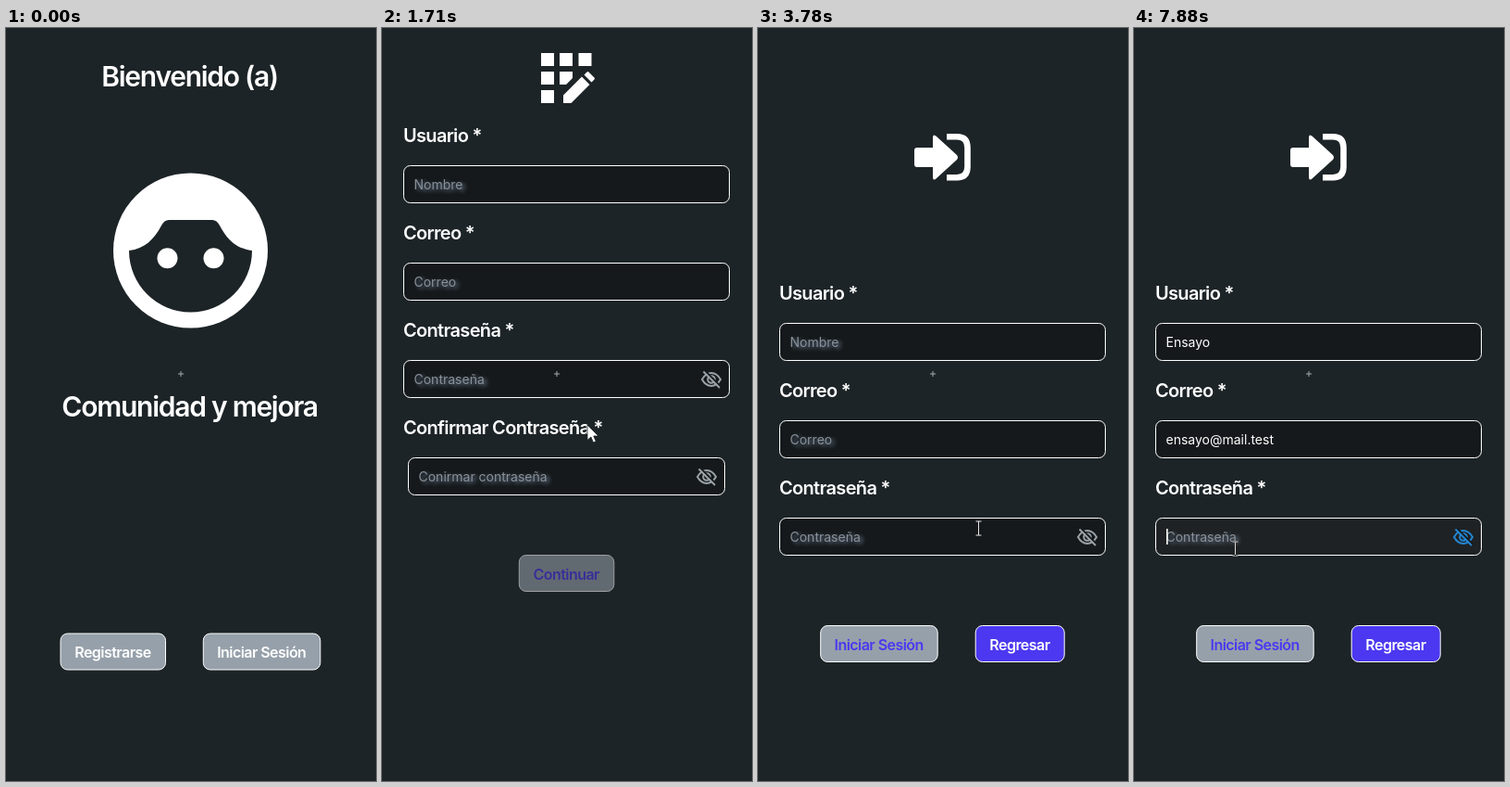
Animation of 400x812 px, one loop 8000 ms. Source, as an HTML page:

```html
<!DOCTYPE html>
<html lang="es">
<head>
<meta charset="utf-8">
<style>
  html, body { margin: 0; width: 100%; height: 100%; overflow: hidden; background: #1d2427; }
  svg { display: block; width: 400px; height: 812px; font-family: Inter, sans-serif; font-optical-sizing: none; }
  .title { font-size: 30px; font-weight: 600; letter-spacing: -.042em; text-anchor: middle; fill: #fff; }
  .label { font-size: 20px; font-weight: 600; letter-spacing: -.034em; fill: #fff; }
  .button { font-size: 16px; font-weight: 600; letter-spacing: -.034em; text-anchor: middle; }
  .value { font-size: 14px; fill: #fff; }
  .hint { font-size: 14px; fill: #89929a; filter: drop-shadow(3px 2px 2px #6c7c94); }
  .box { fill: #15191b; stroke: #fff; }
  .box.focus { fill: #1f2224; }
  .eye { fill: none; stroke: #9aa2a8; stroke-width: 2; }
  .eye.focus { stroke: #2385d2; }
  #ibeam { mix-blend-mode: difference; }
</style>
</head>
<body>
<svg id="stage" viewBox="0 0 400 812"></svg>
<script>
const DURATION = 8000, BLINK = 530;
const GREY = '#96a0aa', HOVER = '#9fa8b2', VIOLET = '#4b38f0';
const stage = document.getElementById('stage');

const button = (x, y, width, text, fill, color, id = '') => `
  <rect id="${id}" x="${x}" y="${y}" width="${width}" height="39" rx="7.5" fill="${fill}" stroke="#fff"/>
  <text class="button" x="${x + width / 2 - .3}" y="${y + 26}" fill="${color}">${text}</text>`;

const eye = (x, y) => `
  <g class="eye" transform="translate(${x} ${y})">
    <path d="M-10 0Q-6-7 0-7T10 0Q6 7 0 7T-10 0Z"/><circle r="3.8"/>
    <path d="M-7-9.5L10.5 8" stroke="#15191b"/><path d="M-8.5-8.5L9 9"/>
  </g>`;

const field = (y, label, hint, secret, inset = 0) => `
  <g class="field">
    <text class="label" x="23" y="${y - 25}">${label} *</text>
    <rect class="box" x="${23.5 + inset}" y="${y + .5}" width="${352 - 2 * inset}" height="40" rx="7"/>
    <text class="hint" x="${34.5 + inset}" y="${y + 26}">${hint}</text>
    <text class="value" x="34.5" y="${y + 26}"></text>
    ${secret ? eye(356 - inset, y + 21) : ''}
  </g>`;

const fields = y => field(y, 'Usuario', 'Nombre') + field(y + 105, 'Correo', 'Correo')
  + field(y + 210, 'Contraseña', 'Contraseña', true);

stage.innerHTML = `
  <rect width="400" height="812" fill="#1d2427"/>
  <g id="welcome">
    <text class="title" x="198.6" y="63">Bienvenido (a)</text>
    <circle cx="199.5" cy="240" r="83.5" fill="#fff"/>
    <path fill="#1d2427" d="M133 240A66.5 66.5 0 0 0 266 240C249 238 239 228 231 213Q228 207 223 207H176Q171 207 168 213C160 228 150 238 133 240Z"/>
    <circle cx="174.5" cy="248.3" r="11" fill="#fff"/><circle cx="224.5" cy="248.3" r="11" fill="#fff"/>
    <text class="title" x="198.6" y="419">Comunidad y mejora</text>
    ${button(59, 653, 113.5, 'Registrarse', GREY, '#fff')}
    ${button(213.3, 653, 126.5, 'Iniciar Sesión', GREY, '#fff', 'enter')}
  </g>
  <g id="register">
    <path fill="#fff" d="M172 27h14v14h-14zM192 27h14v14h-14zM212.500 27h14v14h-14zM172 47h14v14h-14zM192 47h14v7l-7 7h-7zM172 67h14v14h-14z
      M196 81v-8.500l20-20 8.500 8.500-20 20zM218.500 50.500l3-3q1-1 2 0l6 6q1 1 0 2l-3 3z"/>
    ${fields(148)}${field(463, 'Confirmar Contraseña', 'Conirmar contraseña', true, 5)}
    <g opacity=".57">${button(148.3, 568.5, 102.5, 'Continuar', GREY, VIOLET)}</g>
  </g>
  <g id="login">
    <path fill="#fff" d="M169 132q0-3 3-3H189V119q0-6 4-2L215 137q2 2.500 0 5L193 162q-4 4-4-2V150H172q-3 0-3-3Z"/>
    <path fill="none" stroke="#fff" stroke-width="6.6" d="M204 117.300H215Q226.500 117.300 226.500 129V149.500Q226.500 161.200 215 161.200H204"/>
    ${fields(318)}
    ${button(67.7, 644.5, 126.5, 'Iniciar Sesión', GREY, VIOLET)}
    ${button(235.2, 644.5, 96, 'Regresar', VIOLET, '#fff')}
    <rect id="caret" width="1.6" height="17" fill="#fff"/>
  </g>
  <path d="M186 373h6M189 370v6" stroke="#a4abad"/>
  <path id="arrow" fill="#fff" stroke="#111820" stroke-width=".8" d="M0 0V16.500L3.900 13 6.400 19 9.300 17.800 6.800 12H12Z"/>
  <path id="hand" fill="#fff" stroke="#111" d="M-2 2A2 2 0 0 1 2 2V8.500Q5.500 7 6 9.500 9 8.500 9.500 11 12 10.500 12 13V16Q12 19 10 23H1Q-1 18-6 13.500-7 11-4.500 11L-2 13Z"/>
  <path id="ibeam" fill="none" stroke="#fff" d="M-3-7.500H3M0-7.500V7.500M-3 7.500H3"/>`;

const byId = id => document.getElementById(id);
const show = (id, on) => byId(id).style.display = on ? '' : 'none';

// Each move: start, end, number of steps, points spread evenly over the steps.
const moves = [
  [330, 1120, 13, [[308, 703], [240, 660], [145, 616], [97, 640], [114, 656.5]]],
  [1180, 1980, 13, [[114, 656.5], [95, 540], [78, 410], [173, 325], [222, 428], [300, 520], [350, 588]]],
  [2050, 2440, 7, [[350, 588], [42, 381]]],
  [2580, 3310, 12, [[42, 381], [150, 480], [260, 600], [337, 697], [301, 681]]],
  [3450, 3780, 6, [[301, 681], [270, 610], [238.5, 539.5]]],
  [3780, 4240, 8, [[238.5, 539.5], [180, 430], [116.5, 343.5]]],
  [6280, 6680, 7, [[116.5, 343.5], [124.5, 434.5]]],
  [7410, 7810, 7, [[124.5, 434.5], [109.5, 561.5]]]
];

function pointerAt(time) {
  const move = moves.findLast(([start]) => time >= start);
  if (!move) return null;
  const [start, end, steps, points] = move;
  const progress = Math.min(1, (time - start) / (end - start));
  const at = Math.floor(progress * (steps - 1) + .1) / (steps - 1) * (points.length - 1);
  const i = Math.min(Math.floor(at), points.length - 2);
  return points[i].map((v, axis) => v + (points[i + 1][axis] - v) * (at - i));
}

const inside = ([x, y], left, top, right, bottom) => x > left && x < right && y > top && y < bottom;

function pointerKind(page, point) {
  const tops = { welcome: [], register: [148, 253, 358, 463], login: [318, 423, 528] }[page];
  if (tops.some(top => inside(point, 23, top, 376, top + 41))) return 'ibeam';
  const overButton = page === 'welcome'
    ? inside(point, 59, 653, 173, 692) || inside(point, 213, 653, 340, 692)
    : page === 'login' && inside(point, 235, 644, 331, 684);
  return overButton ? 'hand' : 'arrow';
}

const focusTimes = [4170, 6750, 7820];
const keyTimes = [4900, 5230, 5345, 5460, 5575, 5690];
const EMAIL_TIME = 7345;
const loginFields = [...document.querySelectorAll('#login .field')];

function drawLogin(time) {
  const focus = focusTimes.findLastIndex(start => time >= start);
  const typed = keyTimes.filter(key => time >= key).length;
  const values = ['Ensayo'.slice(0, typed), time >= EMAIL_TIME ? 'ensayo@mail.test' : '', ''];
  loginFields.forEach((group, i) => {
    group.querySelector('.value').textContent = values[i];
    group.querySelector('.hint').style.display = values[i] ? 'none' : '';
    group.querySelectorAll('.box, .eye').forEach(part => part.classList.toggle('focus', i === focus));
  });
  const lastInput = Math.max(...[...focusTimes, ...keyTimes, EMAIL_TIME].filter(start => time >= start));
  const lit = focus >= 0 && Math.floor((time - lastInput) / BLINK) % 2 === 0;
  show('caret', lit);
  if (!lit) return;
  const value = loginFields[focus].querySelector('.value');
  byId('caret').setAttribute('x', 35 + (values[focus] ? value.getComputedTextLength() : 0));
  byId('caret').setAttribute('y', 330 + focus * 105);
}

function draw(time) {
  const page = time < 1250 ? 'welcome' : time < 2640 ? 'register' : time < 3510 ? 'welcome' : 'login';
  for (const id of ['welcome', 'register', 'login']) show(id, id === page);
  byId('enter').setAttribute('fill', time > 3200 ? HOVER : GREY);
  if (page === 'login') drawLogin(time);

  const point = pointerAt(time);
  const kind = point && pointerKind(page, point);
  for (const id of ['arrow', 'hand', 'ibeam']) show(id, id === kind);
  if (point) byId(kind).setAttribute('transform', `translate(${point})`);
}

const begin = performance.now();
function tick() {
  draw((performance.now() - begin) % DURATION);
  requestAnimationFrame(tick);
}
tick();
</script>
</body>
</html>
```
